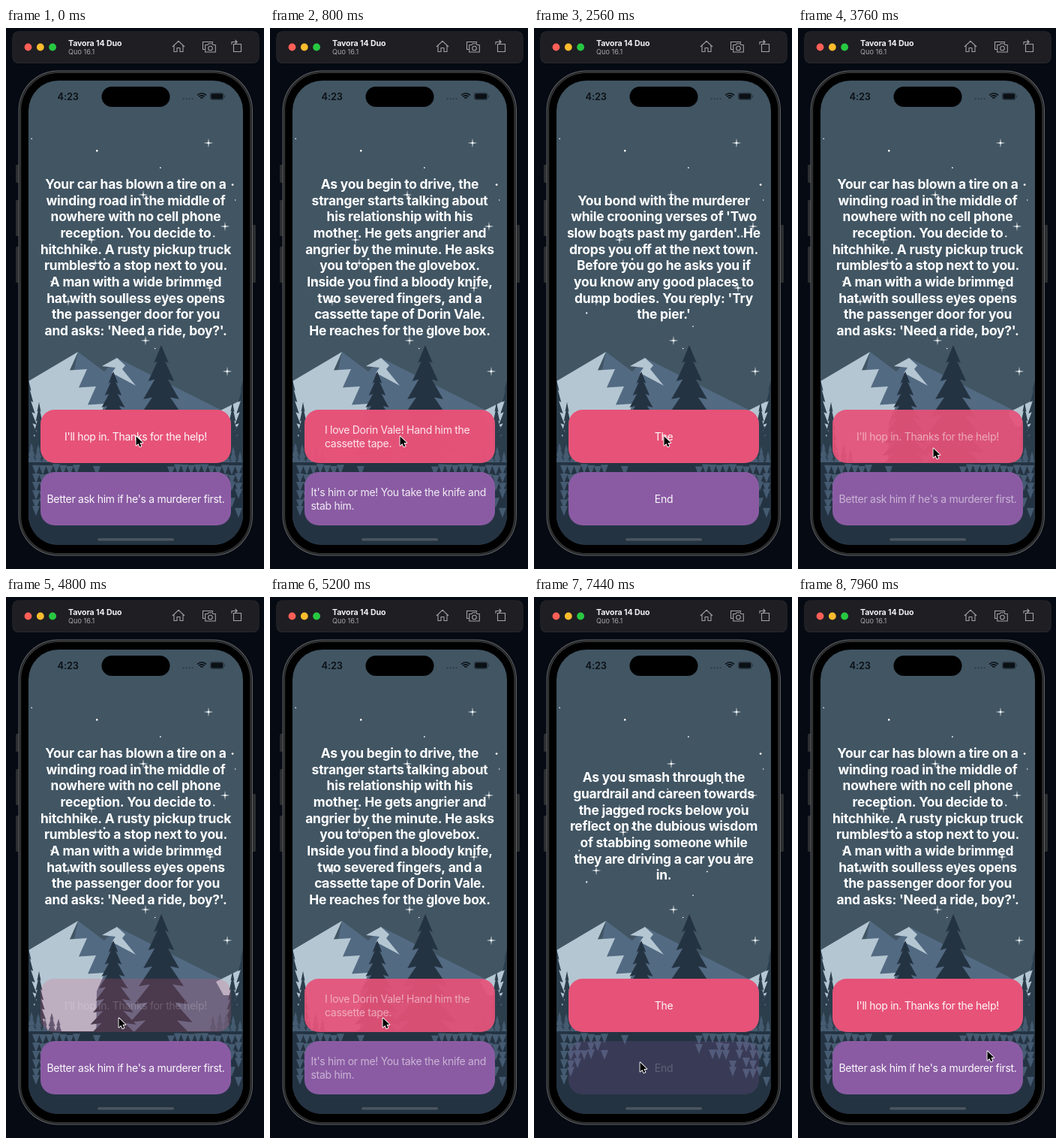
These frames come from a looping animation (344 px wide and 720 px high, 8000 ms). An HTML page with a canvas:

```html
<!DOCTYPE html>
<html lang="en">
<head>
<meta charset="utf-8">
<title>Story game</title>
<style>
html, body { margin: 0; width: 100%; height: 100%; overflow: hidden; background: #050a12; }
canvas { display: block; width: 344px; height: 720px; }
</style>
</head>
<body>
<canvas id="stage"></canvas>
<script>
const W = 344, H = 720, LOOP = 8000;
const FONT = 'Inter, "Open Sans", sans-serif';
const ratio = window.devicePixelRatio || 1;
const canvas = document.getElementById('stage');

const END = ['The', 'End'];
const PAGES = {
  start: {
    story: `Your car has blown a tire on a
winding road in the middle of
nowhere with no cell phone
reception. You decide to
hitchhike. A rusty pickup truck
rumbles to a stop next to you.
A man with a wide brimmed
hat with soulless eyes opens
the passenger door for you
and asks: 'Need a ride, boy?'.`,
    titles: ["I'll hop in. Thanks for the help!", "Better ask him if he's a murderer first."]
  },
  drive: {
    story: `As you begin to drive, the
stranger starts talking about
his relationship with his
mother. He gets angrier and
angrier by the minute. He asks
you to open the glovebox.
Inside you find a bloody knife,
two severed fingers, and a
cassette tape of Dorin Vale.
He reaches for the glove box.`,
    titles: ['I love Dorin Vale! Hand him the\ncassette tape.',
      "It's him or me! You take the knife and\nstab him."]
  },
  bond: {
    story: `You bond with the murderer
while crooning verses of 'Two
slow boats past my garden'. He
drops you off at the next town.
Before you go he asks you if
you know any good places to
dump bodies. You reply: 'Try
the pier.'`,
    titles: END
  },
  crash: {
    story: `As you smash through the
guardrail and careen towards
the jagged rocks below you
reflect on the dubious wisdom
of stabbing someone while
they are driving a car you are
in.`,
    titles: END
  }
};

const COLORS = ['#e75278', '#8a5ba3'];
const buttonTop = i => 508 + 83 * i;

// Finger down, button, page that follows
const TAPS = [
  [315, 0, 'drive'], [1830, 0, 'bond'], [3340, 0, 'start'],
  [4780, 0, 'drive'], [6205, 1, 'crash'], [7400, 1, 'start']
];
const HOLD = 58, FADE = 470, PRESSED = 0.2;

// Pointer moves: start, end, x, y
const MOVES = [
  [3520, 3740, 180, 559], [4000, 4440, 150, 560],
  [5440, 6140, 141, 619], [7620, 7940, 252, 604]
];

const clamp = u => Math.max(0, Math.min(1, u));
const ease = u => { u = clamp(u); return u * u * (3 - 2 * u); };
const easeOut = u => 1 - (1 - clamp(u)) ** 1.6;
const mix = (a, b, u) => a + (b - a) * u;

function seeded(seed) {
  return () => (seed = (seed * 16807) % 2147483647) / 2147483647;
}

function box(c, x, y, w, h, r, fill) {
  c.beginPath();
  c.roundRect(x, y, w, h, r);
  c.fillStyle = fill;
  c.fill();
}

function disc(c, x, y, r, fill) {
  c.beginPath();
  c.arc(x, y, r, 0, Math.PI * 2);
  c.fillStyle = fill;
  c.fill();
}

function poly(c, fill, points) {
  c.beginPath();
  points.forEach(p => c.lineTo(...p));
  c.closePath();
  c.fillStyle = fill;
  c.fill();
}

function text(c, str, x, y, font, fill, align = 'left', gap = 0) {
  c.font = font + ' ' + FONT;
  c.letterSpacing = gap + 'px';
  c.textAlign = align;
  c.fillStyle = fill;
  c.fillText(str, x, y);
}

// Tiers widen away from the tip
function fir(c, x, y, half, h, tiers, fill) {
  const side = [];
  for (let i = 1; i <= tiers; i++) {
    const w = half * (i / tiers) ** 0.8, ty = y + h * i / tiers;
    side.push([w, ty], [w * 0.5, ty - h * 0.015]);
  }
  poly(c, fill, [[x, y], ...side.map(([w, ty]) => [x + w, ty]), ...side.reverse().map(([w, ty]) => [x - w, ty])]);
}

function sparkle(c, x, y, r) {
  const points = [];
  for (let i = 0; i < 8; i++) {
    const d = i % 2 ? r * 0.14 : r, a = i * Math.PI / 4;
    points.push([x + d * Math.cos(a), y + d * Math.sin(a)]);
  }
  poly(c, '#fff', points);
  disc(c, x, y, r * 0.17, '#fff');
}

function drawStars(c) {
  const rand = seeded(77);
  for (let i = 0; i < 16; i++) {
    disc(c, 34 + rand() * 276, 145 + (i + rand()) * 18, 0.7 + rand() * 0.7, '#fff');
  }
  [[270, 153], [183, 222], [114, 282], [292, 264], [119, 313], [272, 346], [83, 364], [186, 416], [295, 457]]
    .forEach(([x, y]) => sparkle(c, x, y, 6.5));
}

function drawMountains(c) {
  const snow = '#b4c6d2', rock = '#526a82', base = 600;
  poly(c, rock, [[148, 439], [148 + 322, base], [0, base]]);
  poly(c, snow, [[128, 450], [148, 439], [159, 449], [155, 454], [173, 476], [141, 459], [146, 452]]);
  poly(c, rock, [[96, 431], [96 + 225, base], [60, base]]);

  const edge = [];
  for (let i = 0; i < 8; i++) {
    const notch = i % 2;
    edge.push([96 + 6 * i - 17 * notch, 431 + 11.5 * i + 13 * notch]);
  }
  poly(c, snow, [[30, 470], ...edge, [120, base], [30, base]]);
  poly(c, snow, [[280, 512], [316, 494], [316, 530], [290, 530]]);
}

function drawForest(c) {
  const dark = '#243342', edge = '#2c3e4c', haze = '#455b71';
  const rand = seeded(9);
  for (const dir of [1, -1]) {
    const x = dir > 0 ? 30 : 316;
    fir(c, x, 468, 19, 120, 8, edge);
    fir(c, x + dir * 14, 498, 12, 90, 7, edge);
    for (let i = 0; i < 5; i++) fir(c, x + dir * (4 + i * 9), 552 + rand() * 12, 8, 36, 4, haze);
  }
  c.fillStyle = dark;
  c.fillRect(30, 578, 286, 110);
  fir(c, 207, 422, 47, 168, 7, dark);
  fir(c, 143, 457, 34, 128, 8, dark);

  // Small upturned triangles thin out towards the middle and the bottom
  for (let row = 0; row < 6; row++) {
    for (let x = 40; x < 312; x += 9) {
      const y = 580 + row * 11 + rand() * 4, away = Math.abs(x - 173) / 137;
      if (rand() > away * 1.25 - row * 0.15) continue;
      poly(c, haze, [[x - 5, y], [x + 5, y], [x, y + 13]]);
    }
  }
}

function drawStatus(c) {
  const ink = '#0b1015', faint = '#2d3b46';
  box(c, 127.5, 78, 91, 27, 13.5, '#000');
  text(c, '4:23', 68.5, 95.6, '600 12.8px', ink, 'left', -0.1);
  for (let i = 0; i < 4; i++) disc(c, 236.5 + i * 4, 94.3, 1.1, faint);
  c.lineWidth = 1.7;
  c.strokeStyle = ink;
  for (const r of [8, 5.2, 2.4]) {
    c.beginPath();
    c.arc(261, 95, r, -Math.PI * 0.76, -Math.PI * 0.24);
    c.stroke();
  }
  box(c, 272, 86, 18.5, 10, 3, faint);
  box(c, 273.5, 87.5, 15.5, 7, 1.8, ink);
  box(c, 291, 89.5, 1.2, 3, 0.6, faint);
  box(c, 122, 679, 102, 3.4, 1.7, '#4a555f');
}

function drawIcons(c) {
  c.strokeStyle = '#a3a3a7';
  c.lineWidth = 1.1;
  c.lineJoin = 'round';
  const line = d => c.stroke(new Path2D(d));
  line('M222 25 L230 17.3 L238 25 M224 23.4 V31.5 H228 V26.5 H232 V31.5 H236 V23.4');
  line('M265 28.5 H262.5 V18.5 H275.5 V20');
  line('M265.7 22.5 H269 L270 20.8 H275 L276 22.5 H279.3 V32 H265.7 Z');
  line('M303.5 21.5 H313.5 V31.5 H303.5 Z M301 22 V18.5 H308 M305.5 16 L308.2 18.5 L305.5 21');
  c.beginPath();
  c.arc(272.5, 27, 2.8, 0, Math.PI * 2);
  c.stroke();
}

function drawWindowBar(c) {
  box(c, 8.5, 4.5, 329, 42.5, 8, '#343438');
  box(c, 9, 5, 328, 41.5, 7.5, '#1e1e23');
  ['#fe5f57', '#febc2e', '#28c840'].forEach((color, i) => disc(c, 29.5 + i * 16.3, 25.5, 4.9, color));
  text(c, 'Tavora 14 Duo', 83, 23.8, '700 10.6px', '#f2f2f3', 'left', -0.1);
  text(c, 'Quo 16.1', 83, 35.2, '400 9.2px', '#a5a5a9');
  drawIcons(c);
}

function drawPhone(c) {
  const side = '#2b2d2f';
  box(c, 13, 182, 5, 24, 1.2, side);
  for (const y of [229, 291]) box(c, 13, y, 5, 48, 1.2, side);
  box(c, 328, 262, 5, 77, 1.2, side);
  ['#5f6163', '#232527', '#3a3c3e', '#000'].forEach((color, i) => {
    const inset = i < 2 ? i : i + 0.6;
    box(c, 16.5 + inset, 56.5 + inset, 312.5 - 2 * inset, 646 - 2 * inset, 53 - inset, color);
  });
}

function drawBase(c) {
  c.fillStyle = '#050a13';
  c.fillRect(0, 0, W, H);
  drawWindowBar(c);
  drawPhone(c);
  c.beginPath();
  c.roundRect(30, 70, 286, 618, 40);
  c.clip();
  c.fillStyle = '#415563';
  c.fillRect(30, 70, 286, 618);
  drawStars(c);
  drawMountains(c);
  drawForest(c);
  drawStatus(c);
}

function makeLayer(draw) {
  const layer = document.createElement('canvas');
  layer.width = W * ratio;
  layer.height = H * ratio;
  const c = layer.getContext('2d');
  c.scale(ratio, ratio);
  draw(c);
  return layer;
}

// Lines centred on a middle height
function drawLines(c, str, x, mid, step, ...style) {
  const lines = str.split('\n');
  lines.forEach((line, i) => text(c, line, x, mid + (i - (lines.length - 1) / 2) * step, ...style));
}

function drawTitle(c, str, i) {
  const wrapped = str.includes('\n');
  const x = wrapped ? [73, 54.5][i] : 173;
  drawLines(c, str, x, buttonTop(i) + 41, 17.2, '400 14px', '#fff', wrapped ? 'left' : 'center', -0.3);
}

function drawPointer(c, x, y) {
  c.save();
  c.translate(x, y);
  const arrow = new Path2D('M0.5 0.5 V12.6 L3.4 9.9 L5.3 14.2 L7.4 13.3 L5.5 9.1 H9.3 Z');
  c.lineJoin = 'round';
  c.lineWidth = 1.8;
  c.strokeStyle = '#fff';
  c.stroke(arrow);
  c.fillStyle = '#000';
  c.fill(arrow);
  c.restore();
}

// Pages, button opacities and title opacity at time t
function stateAt(t) {
  const s = { story: 'start', titles: 'start', alpha: [1, 1], ink: 1 };
  for (const [down, button, page] of TAPS) {
    if (t < down) break;
    const u = (t - down - HOLD) / FADE;
    s.alpha[button] = mix(PRESSED, 1, easeOut(u));
    if (u < 0) break;
    s.story = page;
    if (u >= 0.5) s.titles = page;
    s.ink = ease(Math.abs(u * 2 - 1));
  }
  return s;
}

function pointerAt(t) {
  let x = 173, y = 543;
  for (const [from, to, nx, ny] of MOVES) {
    const u = ease((t - from) / (to - from));
    x = mix(x, nx, u);
    y = mix(y, ny, u);
  }
  return [x, y];
}

canvas.width = W * ratio;
canvas.height = H * ratio;
const ctx = canvas.getContext('2d');
const base = makeLayer(drawBase);

function render(t) {
  const s = stateAt(t);
  ctx.setTransform(ratio, 0, 0, ratio, 0, 0);
  ctx.drawImage(base, 0, 0, W, H);
  drawLines(ctx, PAGES[s.story].story, 173, 311.4, 21.64, '700 17.4px', '#fff', 'center', -0.22);
  COLORS.forEach((color, i) => {
    ctx.globalAlpha = s.alpha[i];
    box(ctx, 46, buttonTop(i), 254, 71, 19, color);
    ctx.globalAlpha = s.alpha[i] * s.ink * 0.96;
    drawTitle(ctx, PAGES[s.titles].titles[i], i);
    ctx.globalAlpha = 1;
  });
  drawPointer(ctx, ...pointerAt(t));
}

const began = performance.now();
function tick() {
  render((performance.now() - began) % LOOP);
  requestAnimationFrame(tick);
}
tick();
</script>
</body>
</html>
```
